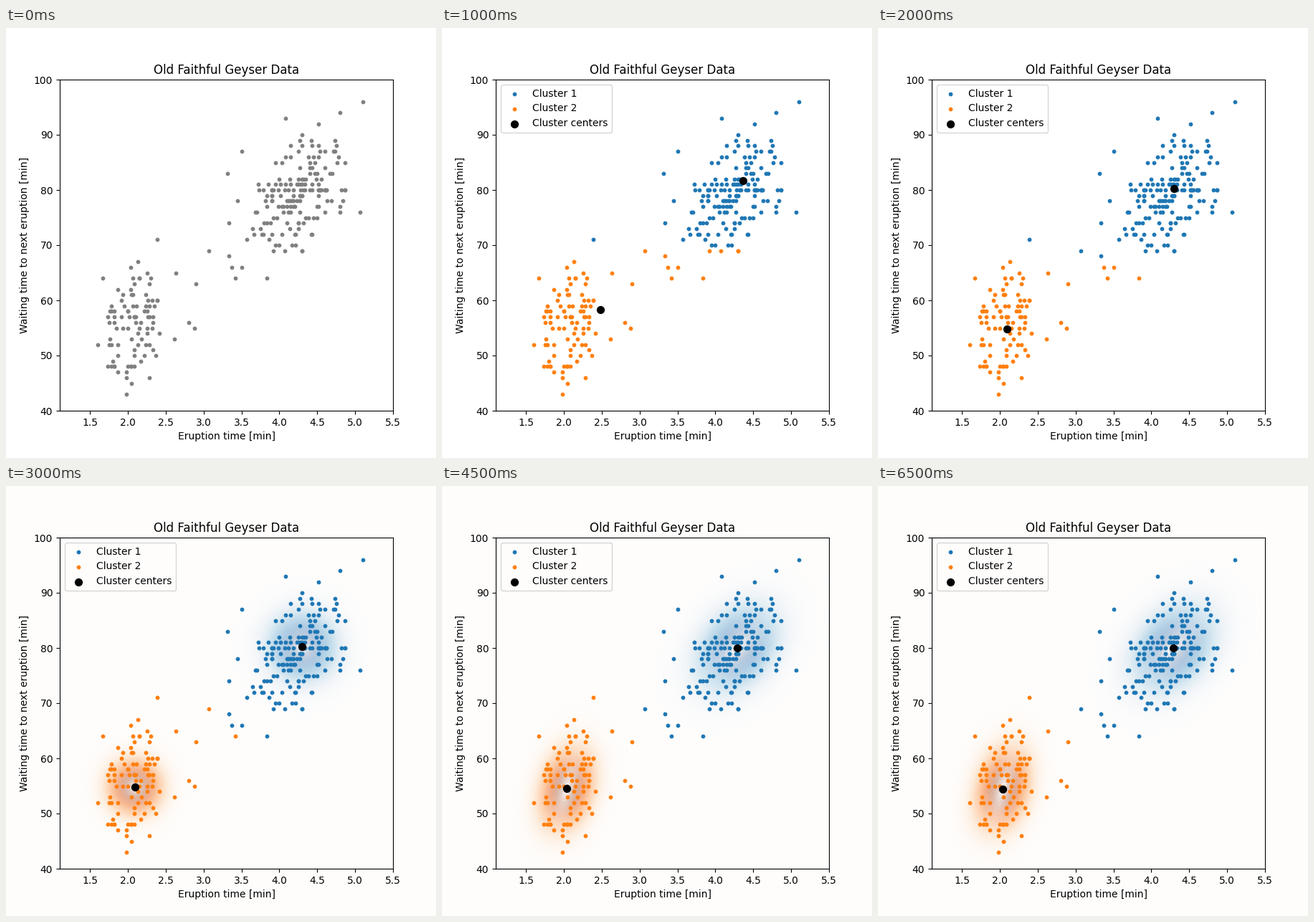
A matplotlib script that plays this animation: 600x600 px, repeating every 7 s.

```python
import numpy as np
import matplotlib.pyplot as plt
from matplotlib.animation import FuncAnimation
from matplotlib.patches import Rectangle

plt.rcParams["font.family"] = "DejaVu Sans"
FRAMES, INTERVAL = 14, 500
KMEANS_START, EM_START = 2, 6
BLUE, ORANGE = "#1f77b4", "#ff7f0e"
DOT_SIZE, CENTER_SIZE = 40, 50

# Centers along the way, first cluster on top.
SEEDS = np.array([(4.28, 79), (4.0, 70)])
KMEANS_FIRST = np.array([(4.36, 81.75), (2.48, 58.25)])
KMEANS_LAST = np.array([(4.30, 80.25), (2.09, 54.8)])
EM_LAST = np.array([(4.29, 79.97), (2.037, 54.48)])
# Variance of x, covariance, variance of y.
COV_FIRST = np.array([(0.116, 0, 22), (0.07, 0, 13.3)])
COV_LAST = np.array([(0.170, 0.94, 36), (0.069, 0.435, 33.7)])

# Eruptions that stand apart from the two clouds.
LONERS = [(1.98, 43), (1.6, 52), (2.62, 53), (2.88, 55), (2.8, 56), (2.9, 63),
          (2.63, 65), (2.13, 67), (1.67, 64), (2.38, 71), (3.07, 69), (3.33, 68),
          (3.37, 66), (3.5, 66), (3.42, 64), (3.83, 64), (4.07, 69), (4.0, 70),
          (3.57, 71), (3.33, 74), (3.45, 78), (3.32, 83), (3.5, 87), (4.08, 93),
          (4.8, 94), (5.1, 96), (5.07, 76)]


def distance2(x, y, mean, cov):
    """Squared Mahalanobis distance."""
    dx, dy = x - mean[0], y - mean[1]
    a, b, c = cov
    return (c * dx**2 - 2 * b * dx * dy + a * dy**2) / (a * c - b * b)


def sample_cloud(rng, count, mean, cov, shortest, longest):
    """Normal points inside two deviations and the given eruption times."""
    a, b, c = cov
    points = rng.multivariate_normal(mean, [[a, b], [b, c]], 8 * count)
    x, y = points.T
    inside = (distance2(x, y, mean, cov) < 4) & (x > shortest) & (x < longest)
    return points[inside][:count]


def make_data():
    rng = np.random.default_rng(7)
    data = np.vstack([sample_cloud(rng, 158, EM_LAST[0], COV_LAST[0], 3.6, 5.0),
                      sample_cloud(rng, 87, EM_LAST[1], COV_LAST[1], 1.73, 2.45),
                      LONERS])
    # Eruptions come in whole seconds, waiting times in whole minutes.
    return np.round(data * (60, 1)) / (60, 1)


def cluster_state(frame):
    """Centers, covariances and the mask of the first cluster."""
    x, y = data.T
    if frame < EM_START:
        centers = SEEDS
        if frame >= KMEANS_START:
            rest = 0.1 ** (frame - KMEANS_START) ** 2
            centers = KMEANS_LAST + rest * (KMEANS_FIRST - KMEANS_LAST)
        gaps = [np.hypot(x - cx, y - cy) for cx, cy in centers]
        return centers, None, gaps[0] < gaps[1]
    rest = 0.3 ** (frame - EM_START)
    centers = EM_LAST + rest * (KMEANS_LAST - EM_LAST)
    covs = COV_LAST + rest * (COV_FIRST - COV_LAST)
    # The dividing line straightens as the fit settles.
    return centers, covs, x + 0.05 * rest * (y - 66) > 3 + 0.34 * rest


data = make_data()
fig, ax = plt.subplots(figsize=(6, 6), dpi=100)
backdrop = Rectangle((0, 0), 1, 1, transform=fig.transFigure, zorder=-1, lw=0)
fig.add_artist(backdrop)
ax.set_facecolor("none")
ax.set(xlim=(1.1, 5.5), ylim=(40, 100), title="Old Faithful Geyser Data",
       xlabel="Eruption time [min]", ylabel="Waiting time to next eruption [min]")
ax.set_xticks(np.arange(1.5, 5.6, 0.5))

raw = ax.scatter(*data.T, s=DOT_SIZE, marker=".", color="gray", zorder=3)
groups = [ax.scatter([], [], s=DOT_SIZE, marker=".", color=color,
                     label=f"Cluster {i}", zorder=3)
          for i, color in enumerate((BLUE, ORANGE), 1)]
center_dots = ax.scatter([], [], s=CENTER_SIZE, color="black",
                         label="Cluster centers", zorder=4)
legend = ax.legend(loc="upper left")
legend.set_zorder(5)

grid_x, grid_y = np.meshgrid(np.linspace(1.1, 5.5, 220), np.linspace(40, 100, 220))
LEVELS = np.linspace(0.01, 0.99, 99)
contours = []


def set_palette(page, colors, edge):
    backdrop.set_facecolor(page)
    legend.get_frame().set(facecolor=page, edgecolor=edge)
    for artists in (groups, legend.legend_handles[:2]):
        for artist, color in zip(artists, colors):
            artist.set_color(color)


def draw_contours(centers, covs):
    for mean, cov, cmap in zip(centers, covs, ("Blues", "Oranges")):
        density = np.exp(-distance2(grid_x, grid_y, mean, cov) / 2)
        contours.append(ax.contour(grid_x, grid_y, density, levels=LEVELS, cmap=cmap,
                                   linewidths=0.5, alpha=0.35, zorder=1))


def update(frame):
    while contours:
        contours.pop().remove()
    raw.set_visible(frame == 0)
    for artist in (*groups, center_dots, legend):
        artist.set_visible(frame > 0)
    if frame == 1:
        set_palette("#3d3d3d", ("#202020", "#161616"), "#313131")
    else:
        page = "#fefdfc" if frame >= EM_START else "white"
        set_palette(page, (BLUE, ORANGE), "#cccccc")
    if frame == 0:
        return
    centers, covs, first = cluster_state(frame)
    groups[0].set_offsets(data[first])
    groups[1].set_offsets(data[~first])
    center_dots.set_offsets(centers)
    if covs is not None:
        draw_contours(centers, covs)


anim = FuncAnimation(fig, update, frames=FRAMES, interval=INTERVAL,
                     init_func=lambda: update(0), repeat=True, repeat_delay=0)
plt.show()
```
